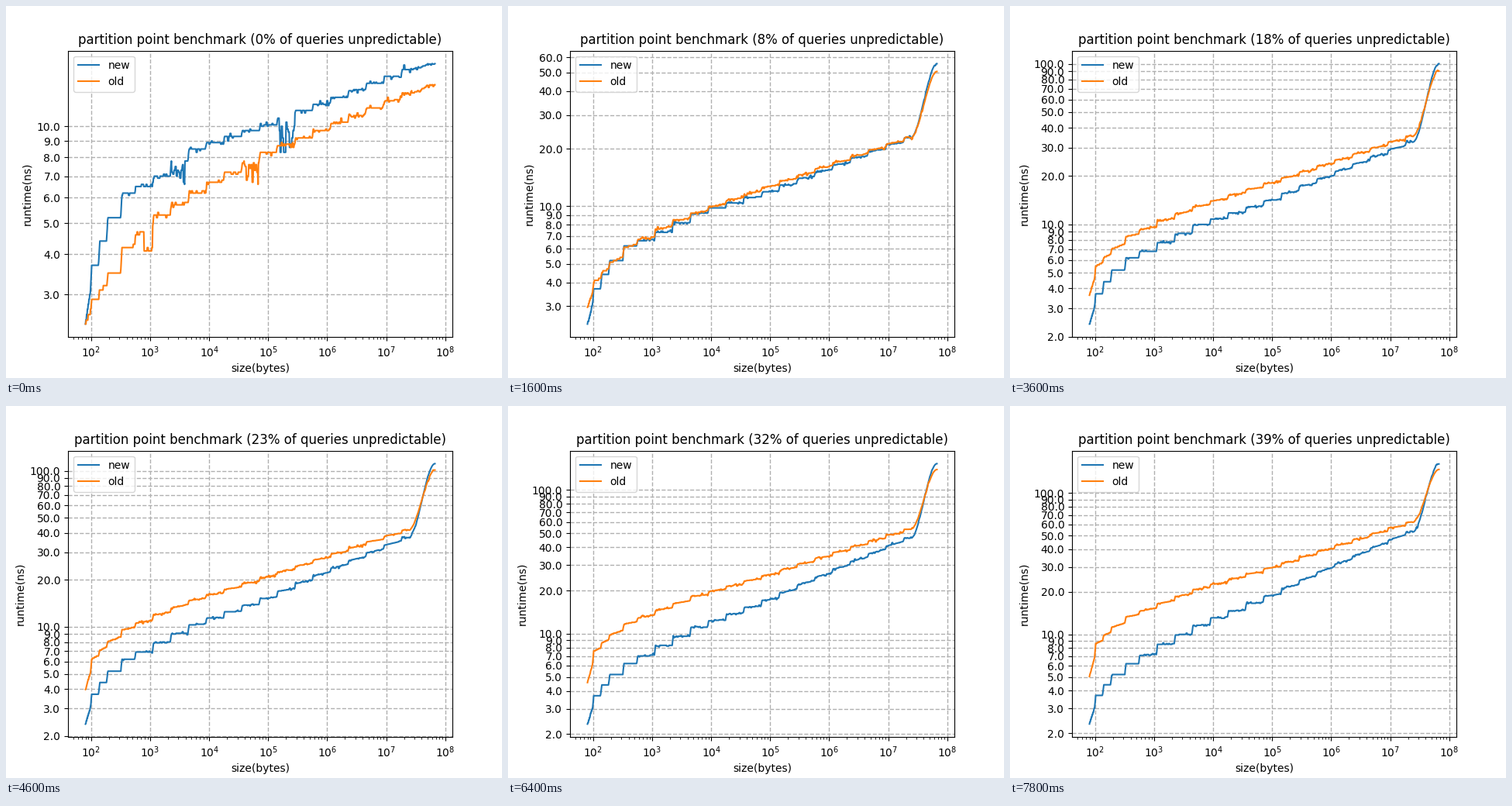
A matplotlib script that plays this animation: 640 by 480 pixels, repeating every 8000 ms.

```python
import numpy as np
import matplotlib.pyplot as plt
from matplotlib.animation import FuncAnimation
from matplotlib.ticker import FixedLocator, FormatStrFormatter, LogLocator

FRAMES, STEP_MS = 40, 200
LAST = FRAMES - 1

# Octaves above the smallest size; every doubling brings a jump in runtime.
SMALLEST, LARGEST = 80, 6.69e7
octave = np.linspace(0, np.log2(LARGEST / SMALLEST), 900)
size = SMALLEST * 2 ** octave
JUMPS = np.r_[0, .35, .8, 1.25, 2.05, np.arange(2.83, 20)]

# Runtime (ns) at a few octaves, without and with the most unpredictable queries.
KEYS = [0, .35, 1.25, 2.05, 3.83, 5.83, 9.83, 17.83]
NEW = ([2.43, 3.7, 5.17, 6.15, 7.0, 8.5, 10.1, 15],
       [2.32, 3.7, 5.15, 6.15, 8.5, 11.6, 18.6, 53])
OLD = ([2.43, 2.85, 3.45, 4.2, 5.25, 6.2, 8.25, 12.65],
       [5.04, 8.6, 11.2, 13.3, 16.5, 20.7, 29.1, 62.2])


def smoothstep(t):
    t = np.clip(t, 0, 1)
    return t * t * (3 - 2 * t)


def between(lo, hi):
    return (octave > lo) & (octave < hi)


def limits(share):
    """Fastest and slowest lookup at this share of unpredictable queries."""
    low = 2.43 - .11 * (share / LAST) ** 1.6
    high = np.interp(share, [0, 4, 12, 18, 23, 32, 39],
                     [15.65, 36.2, 75, 100.2, 111.2, 152.7, 161.4])
    return low, high


def staircase(levels, flatness):
    """Rise between jumps partly as a slope and partly as a sudden step."""
    logs = np.interp(JUMPS, KEYS, np.log(levels))
    i = np.searchsorted(JUMPS, octave, "right") - 1
    ahead = JUMPS[i + 1] - octave
    slope = 1 - ahead / (JUMPS[i + 1] - JUMPS[i])
    step = np.clip(1 - ahead / .06, 0, 1)
    mix = slope + flatness * (step - slope)
    return np.exp(logs[i] + mix * (logs[i + 1] - logs[i]))


def runtime(share, is_new):
    rng = np.random.default_rng(2 * share + is_new)
    n = len(octave)
    low, high = limits(share)
    first, last = np.array(NEW if is_new else OLD)
    levels = first + (last - first) * share / LAST
    if is_new:
        flatness = .92 - .6 * np.sqrt(share / LAST) * np.clip((octave - 9) / 4, 0, 1)
    else:
        flatness = .85 - .3 * min(1, share / 8)
    value = staircase(levels, np.where(octave < .35, .3, flatness))

    # Measurement jitter, with rough stretches while queries are predictable.
    jitter = np.repeat(rng.normal(size=n) * (rng.random(n) < .5), 3)[:n]
    rough = np.repeat(rng.random(n), 3)[:n] * np.exp(-share)
    value *= 1 + jitter * np.where(octave < 2.9, .002, .01)
    if is_new:
        value *= 1 - rough * (.16 * between(4.85, 5.6) + .25 * between(10.9, 11.78))
    else:
        value *= 1 - rough * .15 * between(8.95, 9.72)
        value *= 1 - .12 * np.exp(-share / 4) * between(3.3, 3.77)

    # Steep climb once the data outgrows the cache.
    top = high if is_new else high * (.91 - .05 * np.exp(-share))
    climb = smoothstep((octave - 18.2) / (octave[-1] - 18.2))
    value *= (top / levels[-1]) ** climb
    value[1:] = np.round(value[1:], 1)
    return np.clip(value, low, top)


fig, ax = plt.subplots(figsize=(6.4, 4.8), dpi=100)
ax.set_xscale("log")
ax.set_yscale("log")
new_line, = ax.plot(size, runtime(0, True), label="new")
old_line, = ax.plot(size, runtime(0, False), label="old")
ax.xaxis.set_major_locator(LogLocator(numticks=20))
ax.xaxis.set_minor_locator(LogLocator(subs=range(2, 10), numticks=20))
ax.yaxis.set_major_locator(FixedLocator([*range(2, 10), *range(10, 101, 10)]))
ax.yaxis.set_major_formatter(FormatStrFormatter("%.1f"))
ax.yaxis.set_minor_locator(FixedLocator([]))
ax.grid(linestyle="--", linewidth=1)
ax.set_xlabel("size(bytes)")
ax.set_ylabel("runtime(ns)")
ax.legend(loc="upper left")


def draw(share):
    new_line.set_ydata(runtime(share, True))
    old_line.set_ydata(runtime(share, False))
    low, high = limits(share)
    pad = (high / low) ** .05
    ax.set_ylim(low / pad, high * pad)
    ax.set_title(f"partition point benchmark ({share}% of queries unpredictable)")
    return new_line, old_line


anim = FuncAnimation(fig, draw, frames=FRAMES, interval=STEP_MS,
                     repeat=True, repeat_delay=0, blit=False)
plt.show()
```
